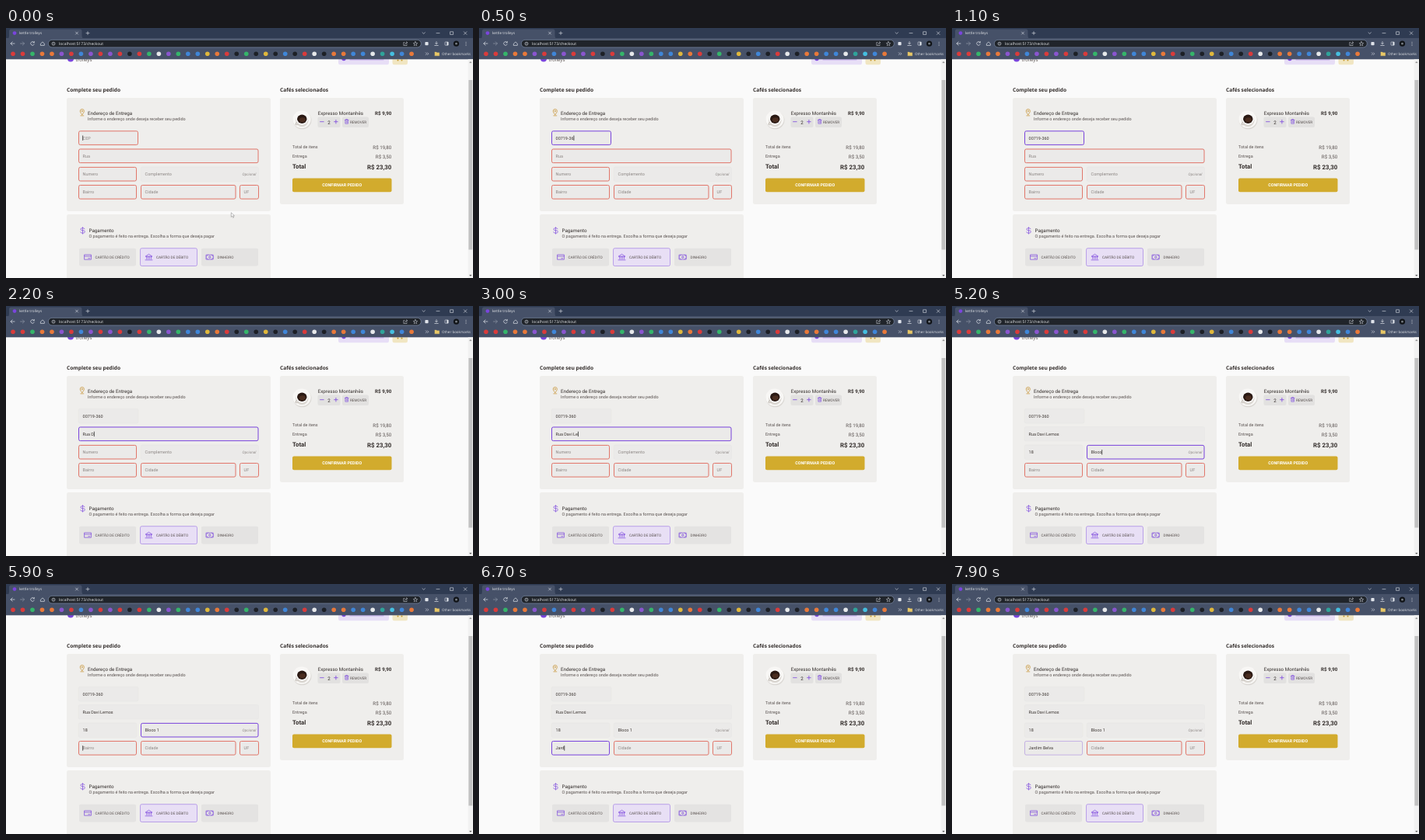
These frames come from a looping animation (600x322 px, 8000 ms). An HTML page:

```html
<!DOCTYPE html>
<html lang="pt-BR">
<head>
<meta charset="utf-8">
<title>Checkout</title>
<style>
  html, body { margin: 0; width: 100%; height: 100%; overflow: hidden; background: #fafafa; }
  svg { display: block; width: 100vw; height: 100vh; }
  text { font-family: Roboto, Arial, sans-serif; white-space: pre; text-rendering: geometricPrecision; }
  .ui, .title { font-family: "Open Sans", "Noto Sans", sans-serif; }
</style>
</head>
<body>
<svg id="stage" viewBox="0 0 600 322"></svg>
<script>
const stage = document.getElementById('stage');
const INK = '#332d2b', BODY = '#574f4d', HINT = '#8b8583', PURPLE = '#7a45dd', RED = '#e2776b';

const rect = (x, y, w, h, fill, r = 0, extra = '') =>
  `<rect x="${x}" y="${y}" width="${w}" height="${h}" rx="${r}" fill="${fill}" ${extra}/>`;
const circle = (x, y, r, fill, extra = '') =>
  `<circle cx="${x}" cy="${y}" r="${r}" fill="${fill}" ${extra}/>`;
const ellipse = (x, y, rx, ry, fill) =>
  `<ellipse cx="${x}" cy="${y}" rx="${rx}" ry="${ry}" fill="${fill}"/>`;
const line = (d, color, width = 0.8, fill = 'none') =>
  `<path d="${d}" fill="${fill}" stroke="${color}" stroke-width="${width}" stroke-linecap="round" stroke-linejoin="round"/>`;
const text = (x, y, size, fill, str, extra = '') =>
  `<text x="${x}" y="${y}" font-size="${size}" fill="${fill}" ${extra}>${str}</text>`;
const BOLD = 'font-weight="700"', END = 'text-anchor="end"', MID = 'text-anchor="middle"';

function browserBar() {
  const pale = '#dfe3ea', strip = '#2f3b52', toolbar = '#465168';
  const hues = { r: '#d93b3b', o: '#e8793a', g: '#35b56a', b: '#3f86d8', p: '#8a55cf', w: '#e6e8ea',
                 y: '#e0b83c', c: '#45bfe0', k: '#1d2026', t: '#2fa39a' };
  const marks = [...'rrgooprbprprkrgwpgbbyorkgkykbkrwkoobbwtcbo'];
  return rect(0, 0, 600, 13.5, strip) + rect(0, 13, 600, 27.3, toolbar) +
    line('M2 13.5Q4 13 4 10.5V4Q4 1.5 6.5 1.5H95Q97.5 1.5 97.5 4V10.5Q97.5 13 100 13.5Z', toolbar, 0, toolbar) +
    circle(11, 6.6, 2.4, PURPLE) +
    text(17, 8.2, 4.7, '#e3e5e8', 'kettle trolleys', 'class="ui"') +
    line('M89.5 5.1l3 3m0-3l-3 3M103 6.6h4m-2-2v4', pale, 0.6) +
    line('M535 5.8l1.7 1.6 1.7-1.6M553 6.6h4M571 4.8h3.6v3.6h-3.6zM588.3 4.8l3.6 3.6m0-3.6l-3.6 3.6', pale, 0.6) +
    line('M11 20H6m2.2-2.2L6 20l2.2 2.2', pale, 0.7) +
    line('M18.5 20h5m-2.2-2.2l2.2 2.2-2.2 2.2', '#8d96a5', 0.7) +
    line('M36 18.4a2.4 2.4 0 1 0 .3 2.6M36.3 17.3v1.6h-1.6', pale, 0.7) +
    line('M44.7 20l2.3-2.1 2.3 2.1v2.4h-4.6z', pale, 0.7) +
    rect(54.3, 15.3, 479, 9.6, '#20242a', 4.8, 'stroke="#8798b5" stroke-width=".6"') +
    circle(61, 20.2, 2, 'none', `stroke="${pale}" stroke-width=".6"`) + line('M61 20v1M61 19v.1', pale, 0.5) +
    text(68, 22, 5.05, '#e6e8ea', 'localhost:5173/checkout', 'class="ui"') +
    line('M512 18.5h-1.2v4h4.2v-1.2M512.5 21q.3-2 3-2.2m-1.2-1.2l1.3 1.2-1.3 1.2', pale, 0.5) +
    line('M526 17.5l.8 1.8 1.9.2-1.5 1.3.5 1.9-1.7-1-1.7 1 .5-1.9-1.5-1.3 1.9-.2z', pale, 0.5) +
    rect(538.4, 18, 4.2, 4.2, pale, 0.8) +
    line('M553 17.6v3m-1.3-1.2l1.3 1.3 1.3-1.3M550.8 22.5h4.4', pale, 0.7) +
    rect(564, 18, 4.2, 4.2, 'none', 0.5, `stroke="${pale}" stroke-width=".6"`) + rect(566.4, 18, 1.8, 4.2, pale) +
    circle(578.5, 20.2, 3.6, '#111418') + circle(578.5, 20.2, 1.4, '#767c82') +
    [18.2, 20.2, 22.2].map(y => circle(591, y, 0.5, pale)).join('') +
    marks.map((m, i) => circle(9 + 12.49 * i, 33.2, 2.8, hues[m])).join('') +
    line('M539.3 31.8l1.4 1.4-1.4 1.4m2.2-2.8l1.4 1.4-1.4 1.4', pale, 0.6) +
    line('M551 31h2l.7.8h3v4h-5.7z', '#e8c766', 0.3, '#e8c766') +
    text(560, 34.9, 4.5, '#e3e5e8', 'Other bookmarks', 'class="ui"');
}

function pageHeader() {
  return circle(83, 39.5, 4, PURPLE) +
    text(89.5, 42.8, 6.2, BODY, 'trolleys', 'class="title"') +
    rect(427, 32, 65, 15.3, '#e7def6', 2.3) + rect(496.5, 32, 19.5, 15.3, '#f1e6c2', 2.3) +
    circle(434, 39.5, 2.7, PURPLE) + line('M442 40.9h43', '#ad8ee3', 0.8) +
    circle(503.5, 41.5, 1, '#c5982c') + circle(508.5, 41.5, 1, '#c5982c');
}

function scrollbar() {
  return rect(593.7, 40.3, 6.3, 282, '#f1f1f1') + rect(594.4, 67, 4.9, 218.5, '#c1c1c1') +
    line('M595.6 44.8h2.6l-1.3-1.5z', '#777', 0.2, '#777') +
    line('M595.6 318h2.6l-1.3 1.5z', '#444', 0.2, '#444');
}

function addressCard() {
  return text(78, 82.4, 6.6, INK, 'Complete seu pedido', `class="title" ${BOLD}`) +
    rect(78, 90, 262, 146, '#efeeec', 2.5) +
    line('M97.8 111.6q-2.6-2.6-2.6-4.5a2.6 2.6 0 0 1 5.2 0q0 1.9-2.6 4.5zM95.8 112.9h4', '#c58f2c', 0.7) +
    circle(97.8, 107.1, 0.9, 'none', 'stroke="#c58f2c" stroke-width=".6"') +
    text(105, 111.7, 6.24, INK, 'Endereço de Entrega') +
    text(105, 118.9, 5.46, BODY, 'Informe o endereço onde deseja receber seu pedido');
}

function paymentCard() {
  const icons = [
    line('M101 292h8.4v6.2H101zM101 294h8.4M105.8 296.7h2', PURPLE, 0.7),
    line('M179.4 294l4.1-2.7 4.1 2.7zM180.6 294.3v3m2-3v3m2-3v3m2-3v3M179 298.8h9', PURPLE, 0.7),
    line('M257.4 292.2h8.8v5.8h-8.8zM257.4 294.2l2-2m6.8 2l-2-2m-6.8 3.8l2 2m6.8-2l-2 2', PURPLE, 0.7) +
      circle(261.8, 295.1, 1.2, 'none', `stroke="${PURPLE}" stroke-width=".7"`)
  ];
  const labels = ['CARTÃO DE CRÉDITO', 'CARTÃO DE DÉBITO', 'DINHEIRO'];
  return rect(78, 240, 262, 90, '#efeeec', 2.5) +
    line('M98.5 256.6v8.6M101 258.8q-.3-1.1-1.7-1.1h-1.6q-1.7 0-1.7 1.5t1.7 1.6h1.8q1.8 0 1.8 1.6t-1.8 1.7h-1.8q-1.7 0-1.9-1.3', PURPLE, 0.7) +
    text(106.5, 262.6, 6.24, INK, 'Pagamento') +
    text(106.5, 269.9, 5.46, BODY, 'O pagamento é feito na entrega. Escolha a forma que deseja pagar') +
    labels.map((label, i) => {
      const x = 94 + 78.5 * i, on = i === 1;
      return rect(x, 283.7, 73, 22.8, on ? '#e8dff5' : '#e4e3e2', 2,
        on ? 'stroke="#a481e4" stroke-width=".7"' : '') +
        icons[i] + text(x + 20.4, 296.9, 4.68, BODY, label);
    }).join('');
}

function cartCard() {
  const row = (y, size, label, price, big, style) =>
    text(368, y, size, style ? INK : BODY, label, style) +
    text(495.3, y + 0.6, big, style ? INK : BODY, price, `${END} ${style}`);
  return text(352, 82.4, 6.6, INK, 'Cafés selecionados', `class="title" ${BOLD}`) +
    rect(352, 90, 159, 137, '#efeeec', 2.5) +
    ellipse(380.5, 118.8, 12, 11.5, '#d9d6d2') + ellipse(380, 117.8, 11.7, 11.2, '#f8f7f5') +
    ellipse(380.3, 119.3, 8.2, 8, '#dcd8d3') + line('M375 121q-3.4 1.4-2.8 3.4 1.5 1 4-1', '#c9c4be', 1.2) +
    ellipse(380.3, 117.6, 7.5, 7, '#fff') + ellipse(380.3, 117.3, 6.2, 5.7, '#2b1a14') +
    ellipse(380.8, 118.3, 4, 3, '#4a2d20') +
    text(400.7, 111.7, 6.24, INK, 'Expresso Montanhês') +
    text(495.3, 111.7, 6.2, INK, 'R$ 9,90', `${BOLD} ${END}`) +
    rect(400.5, 114.5, 29, 13.5, '#e2e1e0', 2) + rect(432, 114.5, 34, 13.5, '#e2e1e0', 2) +
    line('M403.6 120.7h4.6M421.6 120.7h4.6m-2.3-2.3v4.6', PURPLE, 0.8) +
    text(415, 123.5, 6.24, INK, '2', MID) +
    line('M435.3 118.6h4.8M436.7 118.4v-.9h2v.9M435.9 118.8v4.4h3.6v-4.4M437.1 120v1.9m1.2-1.9v1.9', PURPLE, 0.6) +
    text(442, 122.8, 4.68, BODY, 'REMOVER') +
    row(155, 5.46, 'Total de itens', 'R$ 19,80', 6.2, '') +
    row(167.2, 5.46, 'Entrega', 'R$ 3,50', 6.2, '') +
    row(180.9, 7.8, 'Total', 'R$ 23,30', 7.8, BOLD) +
    rect(368, 193.4, 127.5, 17.8, '#d2ab2d', 2) +
    text(431.8, 204.3, 5.4, '#fff', 'CONFIRMAR PEDIDO', `${BOLD} ${MID}`);
}

// Times in ms: focus, first key, delay between keys, blur.
const fields = [
  { x: 93, y: 132.3, w: 77, hint: 'CEP', value: '00719-360', focus: -100, type: 110, step: 52, blur: 1450 },
  { x: 93, y: 155.5, w: 231.5, hint: 'Rua', value: 'Rua Davi Lemos', focus: 1450, type: 1690, step: 120, blur: 3700 },
  { x: 93, y: 178.9, w: 75, hint: 'Numero', value: '18', focus: 3700, type: 4190, step: 150, blur: 4500 },
  { x: 173, y: 178.9, w: 151.5, hint: 'Complemento', value: 'Bloco 1', focus: 4500, type: 4690, step: 115, blur: 5900, optional: true },
  { x: 93, y: 202, w: 75, hint: 'Bairro', value: 'Jardim Belva', focus: 5900, type: 6290, step: 120, blur: 7800 },
  { x: 173, y: 202, w: 122.5, hint: 'Cidade', value: '' },
  { x: 300, y: 202, w: 25, hint: 'UF', value: '' }
];

function fieldMarkup(f) {
  return '<g class="field">' + rect(f.x, f.y, f.w, 18.6, '#ebeae9', 2, 'stroke="#e5e4e3" stroke-width=".5"') +
    rect(f.x + 0.5, f.y + 0.5, f.w - 1, 17.6, 'none', 2, 'class="edge" stroke-width="1"') +
    text(f.x + 5.6, f.y + 11.3, 5.46, HINT, f.hint, 'class="entry"') +
    (f.optional ? text(321.3, f.y + 11.2, 4.68, HINT, 'Opcional', `font-style="italic" ${END}`) : '') +
    rect(0, f.y + 6.2, 0.7, 6.4, '#111', 0, 'class="caret"') + '</g>';
}

stage.innerHTML = rect(0, 0, 600, 322, '#fafafa') + pageHeader() + browserBar() + scrollbar() +
  addressCard() + paymentCard() + cartCard() + fields.map(fieldMarkup).join('') +
  '<path id="pointer" d="M289.3 237.8v5.6l1.4-1.2 1 2.2 1-.5-1-2.1h1.8z" fill="#fff" stroke="#777" stroke-width=".5"/>';

const pointer = document.getElementById('pointer');
stage.querySelectorAll('.field').forEach((g, i) => {
  for (const part of ['edge', 'entry', 'caret']) fields[i][part] = g.querySelector('.' + part);
});

const FADE = 150, BLINK = 530;

function drawField(f, t) {
  const count = t >= f.type ? Math.min(f.value.length, Math.floor((t - f.type) / f.step) + 1) : 0;
  const focused = t >= f.focus && t < f.blur;
  const typed = f.value.slice(0, count);
  const label = typed || f.hint;
  if (f.entry.textContent !== label) f.entry.textContent = label;
  f.entry.setAttribute('fill', count ? '#39322f' : HINT);

  const invalid = !count && !f.optional;
  const fade = t >= f.blur ? Math.max(0, 1 - (t - f.blur) / FADE) : 0;
  f.edge.setAttribute('stroke', invalid ? RED : PURPLE);
  f.edge.setAttribute('stroke-opacity', invalid || focused ? 1 : fade);

  const lastChange = count ? f.type + (count - 1) * f.step : f.focus;
  const lit = focused && Math.floor((t - lastChange) / BLINK) % 2 === 0;
  f.caret.setAttribute('visibility', lit ? 'visible' : 'hidden');
  if (lit) f.caret.setAttribute('x', f.x + 5.6 + (count ? f.entry.getComputedTextLength() : -0.2));
}

function frame(now) {
  const t = now % 8000;
  fields.forEach(f => drawField(f, t));
  pointer.setAttribute('visibility', t < 110 ? 'visible' : 'hidden');
  requestAnimationFrame(frame);
}
frame(performance.now());
</script>
</body>
</html>
```
